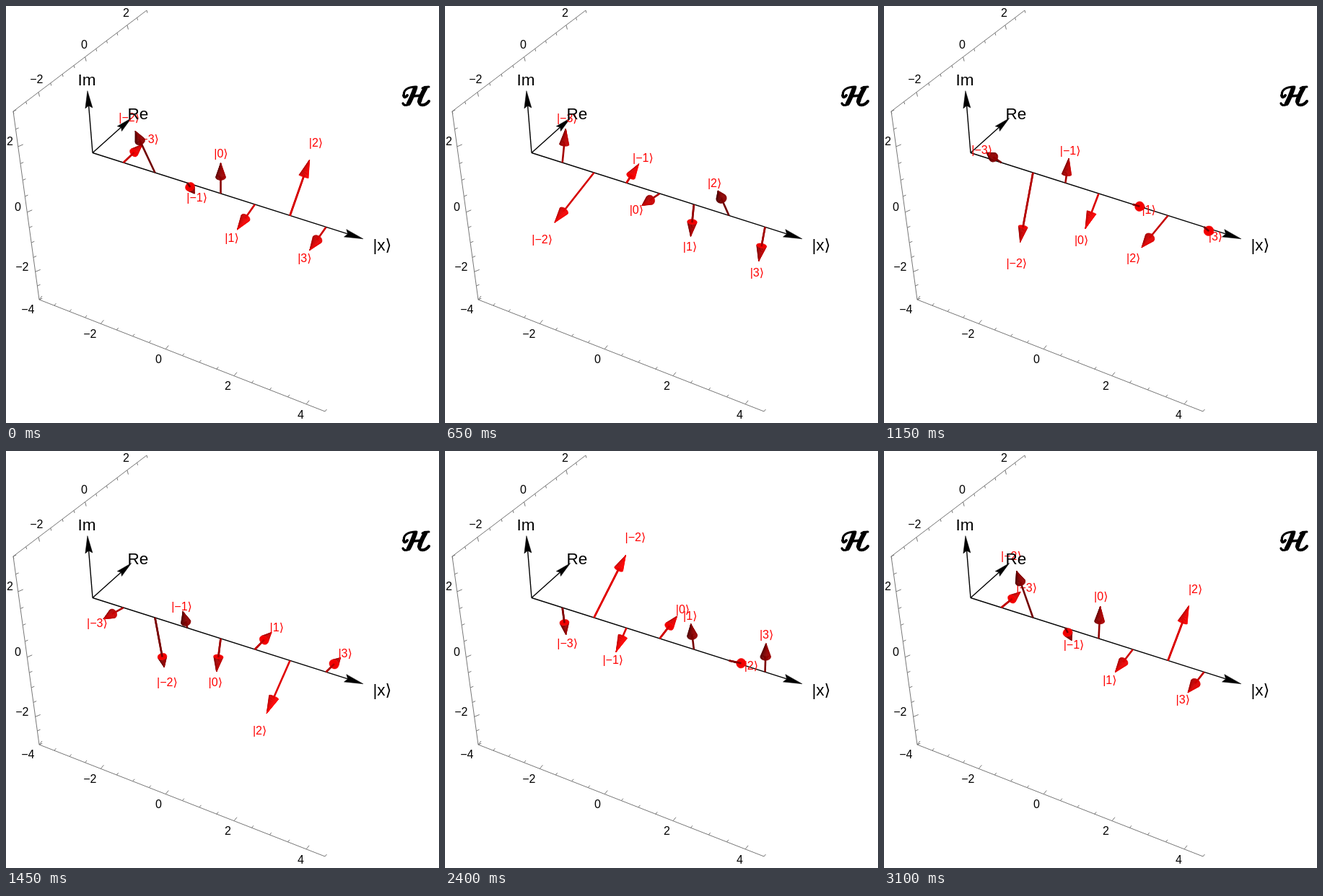
An HTML page with a canvas that plays this animation: 600 px wide and 578 px high, repeating every 3.15 s.

```html
<!DOCTYPE html>
<html lang="en">
<head>
<meta charset="utf-8">
<title>Rotating state amplitudes</title>
<style>
html, body { margin: 0; width: 100%; height: 100%; overflow: hidden; background: #fff; }
canvas { display: block; width: 600px; height: 578px; }
</style>
</head>
<body>
<canvas id="stage"></canvas>
<script>
const canvas = document.getElementById('stage');
const ctx = canvas.getContext('2d');
const dpr = window.devicePixelRatio || 1;
canvas.width = 600 * dpr;
canvas.height = 578 * dpr;

const FONT = '"Liberation Sans", Arial, "DejaVu Sans", sans-serif';
const STEP = 50, COUNT = 63, RAD = Math.PI / 180;
const EYE = [10.2, -19.3, 16.2];

// position on the axis, amplitude, starting phase in degrees
const states = [
  [-3, 0.98, 0.5], [-2, 2, 115], [-1, 0.7, -58], [0, 0.98, 91],
  [1, 0.98, 188.5], [2, 1.5, 46.5], [3, 0.98, 182]
];

const add = (a, b, k = 1) => a.map((v, i) => v + k * b[i]);
const dot = (a, b) => a[0] * b[0] + a[1] * b[1] + a[2] * b[2];

// perspective view of (x, Re, Im)
function project([x, y, z]) {
  const w = 1 - 0.01327 * x + 0.0253 * y - 0.0232 * z;
  return [
    (297.5 + 42.78 * x + 32.65 * y - 6.42 * z) / w,
    (259.95 + 11.41 * x - 21.38 * y - 48.65 * z) / w
  ];
}

function line(a, b, color, width) {
  ctx.beginPath();
  ctx.moveTo(...a);
  ctx.lineTo(...b);
  ctx.strokeStyle = color;
  ctx.lineWidth = width;
  ctx.stroke();
}

function fill(points, color) {
  ctx.beginPath();
  points.forEach(p => ctx.lineTo(...p));
  ctx.closePath();
  ctx.fillStyle = ctx.strokeStyle = color;
  ctx.lineWidth = 0.5;
  ctx.fill();
  ctx.stroke();
}

function text(str, x, y, size, color) {
  ctx.font = size + 'px ' + FONT;
  ctx.fillStyle = color;
  ctx.fillText(str, x + 0.4, y + 1.6);
}

const signed = n => (n < 0 ? '\u2212' : '') + Math.abs(n);
const red = v => `rgb(${Math.round(255 * Math.max(0.3, Math.min(1, v)))},0,0)`;

function cone(tip, dir, e1, e2, len, rad, shade, cap) {
  const base = add(tip, dir, -len), n = 28;
  const slant = Math.hypot(len, rad);
  const radial = i => {
    const a = 2 * Math.PI * i / n;
    return add(e1.map(v => v * Math.cos(a)), e2, Math.sin(a));
  };
  const ring = i => add(base, radial(i), rad);
  const top = project(tip);
  for (let i = 0; i < n; i++) {
    const normal = add(radial(i + 0.5).map(v => v * len / slant), dir, rad / slant);
    if (dot(normal, add(EYE, tip, -1)) <= 0) continue;
    fill([top, project(ring(i)), project(ring(i + 1))], shade(normal));
  }
  const open = dot(dir, add(EYE, base, -1)) < 0;
  if (open) fill(Array.from({ length: n }, (_, i) => project(ring(i))), cap);
  return open;
}

// flat arrow with a notched head
function axisArrow(from, to, len) {
  const a = project(from), b = project(to);
  const size = Math.hypot(b[0] - a[0], b[1] - a[1]);
  const u = [(b[0] - a[0]) / size, (b[1] - a[1]) / size], side = [-u[1], u[0]];
  const back = add(b, u, -len), notch = add(b, u, -len * 0.86), half = len * 0.21;
  line(a, notch, '#000', 1.4);
  fill([b, add(back, side, half), notch, add(back, side, -half)], '#000');
}

// ruler between two screen points; bend gives the perspective spacing
function ruler(a, b, lo, hi, bend, tick, labels) {
  line(a, b, '#777', 1);
  const at = v => {
    const wl = 1 + bend * lo, wh = 1 + bend * hi, k = (v - lo) / (hi - lo);
    const s = k * wh / ((1 - k) * wl + k * wh);
    return [a[0] + (b[0] - a[0]) * s, a[1] + (b[1] - a[1]) * s];
  };
  for (let v = lo; v <= hi + 0.01; v += 0.5) {
    const p = at(v), k = v % 2 === 0 ? 1 : 0.6;
    line(p, add(p, tick, k), '#777', 1);
  }
  labels.forEach(([v, x, y]) => text(signed(v), x, y, 16, '#000'));
}

const letter = [
  [6.2, 'M567 114C564 122 562 128 558 135'],
  [6.2, 'M581 114C577 121 574 127 573 132'],
  [3, 'M552 126C549 117 556 112 569 112'],
  [4, 'M551 124C552 127 554 127 556 124'],
  [3.2, 'M560 133C558 138 552 139 550 135'],
  [3.4, 'M562 125L577 124'],
  [3, 'M577 114C580 112 583 112 586 112'],
  [4, 'M573 132C571 139 581 139 586 132']
].map(([w, d]) => [w, new Path2D(d)]);

function drawLetter() {
  ctx.strokeStyle = '#000';
  ctx.lineCap = 'round';
  letter.forEach(([w, path]) => {
    ctx.lineWidth = w;
    ctx.stroke(path);
  });
  ctx.lineCap = 'butt';
}

function drawState([k, amp, phase], theta) {
  const a = phase * RAD + theta;
  const dir = [0, Math.cos(a), Math.sin(a)];
  const foot = [k, 0, 0], tip = add(foot, dir, amp);
  const glow = 0.69 + 0.23 * Math.cos(2 * (a - 28 * RAD));
  const shaft = () =>
    line(project(foot), project(add(tip, dir, -0.43)), red(glow * 0.96), 2.6);
  const head = () => cone(tip, dir, [1, 0, 0], [0, -dir[2], dir[1]], 0.45, 0.128,
    n => red(glow - 0.05 + 0.14 * n[0]), red(0.95));

  shaft();
  if (head()) shaft();
  const [x, y] = project(add(foot, dir, amp * 1.3 + 0.02));
  text(`|${signed(k)}\u27E9`, x, y, 16, '#f00');
}

function draw(theta) {
  ctx.setTransform(dpr, 0, 0, dpr, 0, 0);
  ctx.fillStyle = '#fff';
  ctx.fillRect(0, 0, 600, 578);
  ctx.textAlign = 'center';
  ctx.textBaseline = 'middle';

  ruler([10, 146], [195, 6], -3, 3, 0.0257, [1.5, 6],
    [[-2, 42, 101], [0, 108, 53], [2, 166, 9]]);
  ruler([46, 407], [10, 146], -3, 3, -0.0237, [7, -3],
    [[-2, 22, 361], [0, 16, 278], [2, 5, 187]]);
  ruler([46, 407], [442, 562], -4, 4.5, -0.0133, [4, -5],
    [[-4, 30, 420], [-2, 116, 454], [0, 211, 489], [2, 307, 526], [4, 408, 566]]);

  const corner = [-4, 0, 0];
  axisArrow(corner, [-4, 2, 0], 22);
  axisArrow(corner, [-4, 0, 1.97], 24);
  axisArrow(corner, [4, 0, 0], 26);

  states.forEach(s => drawState(s, theta));

  text('Im', 111.5, 102, 22.5, '#000');
  text('Re', 182.5, 149, 22.5, '#000');
  text('|x\u27E9', 521, 331, 22.5, '#000');
  drawLetter();
}

const start = performance.now();
function tick() {
  const step = Math.floor((performance.now() - start) / STEP) % COUNT;
  draw(step * 0.1);
  requestAnimationFrame(tick);
}
tick();
</script>
</body>
</html>
```
